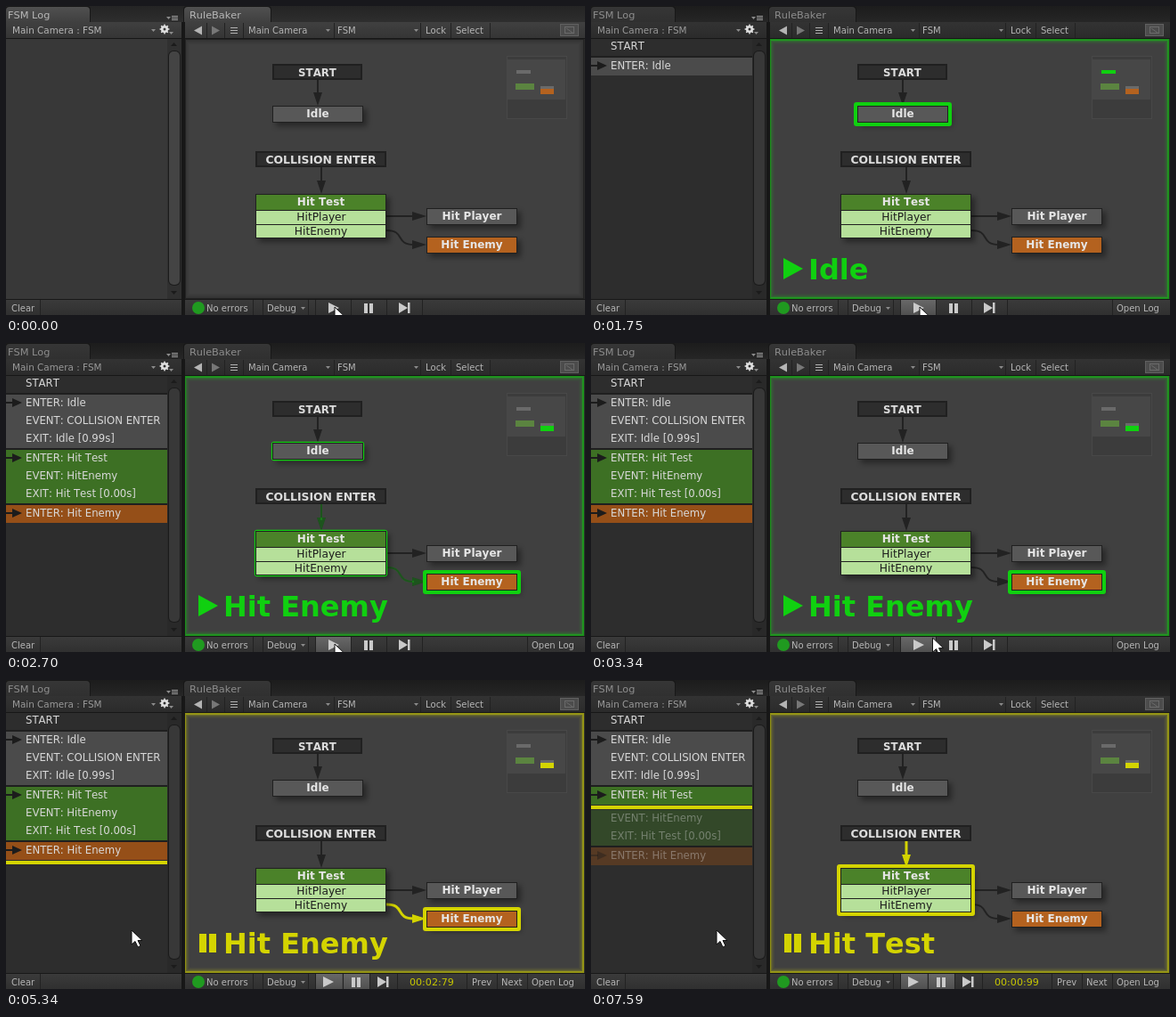
Animation, 650 px wide and 347 px high, one loop 7990 ms. Source, as an HTML page with a canvas:

```html
<!DOCTYPE html>
<html lang="en">
<head>
<meta charset="utf-8">
<title>State machine debugger</title>
<style>
html, body { margin: 0; width: 100%; height: 100%; overflow: hidden; background: #222; }
canvas { display: block; }
</style>
</head>
<body>
<canvas id="stage" width="650" height="347"></canvas>
<script>
const ctx = document.getElementById('stage').getContext('2d');
const LOOP = 7990, GREEN = '#10d010', YELLOW = '#d4d400', DARK = '#222';
ctx.fontKerning = 'none';

// Held steps: n changes, the first at time a and the last at time b.
const steps = (t, a, b, n) =>
  t < a ? 0 : Math.min(1, (Math.floor((t - a) / (b - a) * (n - 1) + 1e-6) + 1) / n);

function box(x, y, w, h, fill) {
  ctx.fillStyle = fill;
  ctx.fillRect(x, y, w, h);
}
function frame(x, y, w, h, color) {
  ctx.strokeStyle = color;
  ctx.lineWidth = 1;
  ctx.strokeRect(x + .5, y + .5, w - 1, h - 1);
}
function round(x, y, w, h, r, fill) {
  ctx.fillStyle = fill;
  ctx.beginPath();
  ctx.roundRect(x, y, w, h, r);
  ctx.fill();
}
function poly(fill, ...p) {
  ctx.fillStyle = fill;
  ctx.beginPath();
  for (let i = 0; i < p.length; i += 2) ctx.lineTo(p[i], p[i + 1]);
  ctx.closePath();
  ctx.fill();
}
function gradient(y, h, top, bottom) {
  const g = ctx.createLinearGradient(0, y, 0, y + h);
  g.addColorStop(0, top);
  g.addColorStop(1, bottom);
  return g;
}
const shade = (x, y, w, h, top, bottom) => box(x, y, w, h, gradient(y, h, top, bottom));

// y is the baseline
function text(s, x, y, size, color, align = 'left', weight = '') {
  ctx.font = `${weight} ${size}px "DejaVu Sans", Verdana, sans-serif`;
  ctx.textAlign = align;
  ctx.fillStyle = color;
  ctx.fillText(s, x, y);
}
const small = (s, x, y, color = '#b6b6b6') => text(s, x, y, 10, color);
const dropdown = (x, y) => poly('#8c8c8c', x, y, x + 5, y, x + 2.5, y + 3);
const divider = (x, y) => box(x, y, 1, 17, '#222');

function tab(x, w, title, dim) {
  round(x - 1, 0, w + 2, 18, [4, 4, 0, 0], '#181818');
  round(x, 1, w, 17, [4, 4, 0, 0], dim ? gradient(1, 17, '#363636', '#303030') : gradient(1, 17, '#505050', '#404040'));
  text(title, x ? x + 6 : 2, 14, 11.3, dim ? '#8e8e8e' : '#b8b8b8');
}

function toolbars(t) {
  const dim = t >= 1250;
  box(0, 0, 650, 347, '#202020');
  shade(0, 0, 650, 18, dim ? '#1c1c1c' : '#242424', dim ? '#262626' : '#2e2e2e');
  tab(0, 94, 'FSM Log', dim);
  tab(200, 97, 'RuleBaker', dim);
  for (const [x, w] of [[0, 197], [201, 449]]) {
    shade(x, 18, w, 18, dim ? '#333' : '#404040', dim ? '#2b2b2b' : '#353535');
    box(x, 36, w, 1, '#171717');
    shade(x, 329, w, 18, '#3b3b3b', '#303030');
    box(x, 329, w, 1, '#181818');
  }
  dropdown(180, 12);
  for (let y = 11; y < 17; y += 2) box(186, y, 7, 1, '#a0a0a0');
  text('Main Camera : FSM', 7, 31, 10.4, dim ? '#999' : '#b6b6b6');
  dropdown(163, 26);
  // settings gear
  ctx.strokeStyle = '#e0e0e0';
  ctx.lineWidth = 2.6;
  ctx.beginPath();
  ctx.arc(178, 26, 2.8, 0, 7);
  ctx.stroke();
  for (let i = 0; i < 8; i++) {
    const a = i * Math.PI / 4;
    box(177.2 + 4.6 * Math.cos(a), 25.2 + 4.6 * Math.sin(a), 1.6, 1.6, '#e0e0e0');
  }
  dropdown(183, 29);

  poly('#b4b4b4', 211, 27.5, 220, 22.5, 220, 32.5);
  poly('#777', 240, 27.5, 231, 22.5, 231, 32.5);
  for (let y = 24; y < 33; y += 3) box(252, y, 8, 1, '#b4b4b4');
  small('Main Camera', 272, 31);
  dropdown(359, 26);
  small('FSM', 372, 31);
  dropdown(458, 26);
  small('Lock', 471, 31);
  small('Select', 505, 31);
  [225, 245, 266, 368, 465, 499, 543].forEach(x => divider(x, 19));
  box(622, 20, 21, 14, '#4c4c4c');
  frame(622, 20, 21, 14, '#606060');
  frame(627, 23, 11, 8, '#6a6a6a');
  ctx.beginPath();
  ctx.moveTo(629, 25);
  ctx.lineTo(636, 30);
  ctx.stroke();

  small('Clear', 6, 343);
  divider(38, 330);
  ctx.fillStyle = '#209a20';
  ctx.beginPath();
  ctx.arc(216, 339, 7, 0, 7);
  ctx.fill();
  small('No errors', 225, 343);
  small('Debug', 293, 343);
  dropdown(331, 338);
  [277, 288, 339].forEach(x => divider(x, 330));
  playButtons(t);
}

function playButtons(t) {
  const paused = t >= 4170, w = paused ? 30.5 : 40, x0 = 347;
  const pressed = [t >= 1090, t >= 4000, false];
  pressed.forEach((down, i) => {
    const x = x0 + i * w;
    if (down) shade(x, 330, w, 17, '#686868', '#505050');
    divider(Math.round(x), 330);
  });
  divider(Math.round(x0 + 3 * w), 330);
  const [a, b, c] = paused ? [362, 393, 423] : [368, 407, 447], ink = '#cacaca';
  poly(ink, a - 6, 333, a + 6, 339, a - 6, 345);
  box(b - 5, 334, 4, 11, ink);
  box(b + 1, 334, 4, 11, ink);
  poly(ink, c - 6, 333, c + 4, 339, c - 6, 345);
  box(c + 4, 333, 2.5, 12, ink);
  if (paused) {
    text(t < 6670 ? '00:02:79' : '00:00:99', 453, 343, 11.1, '#c8c800');
    small('Prev', 523, 343);
    small('Next', 556, 343);
    [517, 551].forEach(x => divider(x, 330));
  }
  if (t >= 1450) {
    small('Open Log', 590, 343);
    divider(585, 330);
  }
}

const LOG = [
  ['START'],
  ['ENTER: Idle', '#4b4b4b'], ['EVENT: COLLISION ENTER', '#4b4b4b'], ['EXIT: Idle [0.99s]', '#4b4b4b'],
  ['ENTER: Hit Test', '#3d7024'], ['EVENT: HitEnemy', '#3d7024'], ['EXIT: Hit Test [0.00s]', '#3d7024'],
  ['ENTER: Hit Enemy', '#954f18']
];

function log(t) {
  const dim = t >= 1250;
  box(0, 37, 181, 292, dim ? '#2d2d2d' : '#383838');
  box(181, 37, 16, 292, dim ? '#292929' : '#303030');
  round(182, 50, 14, 264, 6, '#1b1b1b');
  round(183, 51, 12, 262, 5, dim ? '#383838' : '#444');
  poly('#1b1b1b', 185, 45, 188.5, 41, 192, 45);
  poly('#1b1b1b', 185, 320, 188.5, 324, 192, 320);
  box(197, 18, 4, 329, '#171717');

  const count = t < 1750 ? 0 : t < 2390 ? 2 : 8;
  const cut = t < 4170 ? 99 : t < 6730 ? 8 : t < 7190 ? 7 : t < 7590 ? 6 : 5;
  let y = 36;
  LOG.slice(0, count).forEach(([label, fill], i) => {
    const enter = label.startsWith('ENTER');
    if (enter) {
      box(0, y, 181, 2, '#1f1f1f');
      y += 2;
    }
    ctx.globalAlpha = i < cut ? 1 : .4;
    if (fill) box(0, y, 181, 20, fill);
    if (enter) {
      box(0, y + 8, 8, 2, '#1c1c1c');
      poly('#1c1c1c', 7, y + 4, 18, y + 9, 7, y + 14);
    }
    text(label, 22, y + 13, 11.7, '#d8d8d8');
    ctx.globalAlpha = 1;
    y += 20;
    if (i + 1 === cut) {
      box(0, y + 1, 181, 4, YELLOW);
      y += 6;
    }
  });
}

function arrow(lit, color, x1, y1, x2, y2) {
  const down = x1 === x2;
  const draw = (ink, width) => {
    ctx.strokeStyle = ink;
    ctx.lineWidth = width;
    ctx.beginPath();
    ctx.moveTo(x1, y1);
    if (down) ctx.lineTo(x2, y2 - 12);
    else ctx.bezierCurveTo(x1 + 22, y1, x2 - 36, y2, x2 - 14, y2);
    ctx.stroke();
    if (down) poly(ink, x2 - 5, y2 - 15, x2 + 5, y2 - 15, x2, y2);
    else poly(ink, x2 - 16, y2 - 5, x2, y2, x2 - 16, y2 + 5);
  };
  draw(DARK, 2);
  if (lit) {
    ctx.globalAlpha = lit;
    draw(color, 2 + lit);
    ctx.globalAlpha = 1;
  }
}

function state(name, x, y, w, h, fill, lit, color) {
  ctx.shadowColor = 'rgba(0,0,0,.4)';
  ctx.shadowBlur = 6;
  ctx.shadowOffsetX = ctx.shadowOffsetY = 4;
  box(x, y, w, h, '#262626');
  ctx.shadowColor = 'transparent';
  const grow = 4 * lit;
  if (lit) round(x - grow, y - grow, w + 2 * grow, h + 2 * grow, 3, color);
  box(x, y, w, h, '#202020');
  box(x + 1, y + 1, w - 2, 17, fill);
  text(name, x + w / 2, y + 13, 12, '#e6e6e6', 'center', 'bold');
}

function eventBox(name, x, y, w, size) {
  box(x, y, w, 18, '#202020');
  box(x + 2, y + 2, w - 4, 14, '#2d2d2d');
  text(name, x + w / 2, y + 14, size, '#dcdcdc', 'center', 'bold');
}

function graph(t) {
  const on = t >= 1450, paused = t >= 4170, color = paused ? YELLOW : GREEN;
  const fade = t < 2390 ? 0 : 1 - steps(t, 2390, 2850, 7);
  const idle = t < 2390 ? +on : fade;
  const test = t < 6670 ? fade : 1;
  const enemy = +(t >= 2390 && t < 6670);

  box(201, 37, 449, 292, '#2a2a2a');
  box(202, 38, 446, 290, '#404040');
  for (let i = 0; i < 6; i++) {
    ctx.globalAlpha = on ? [.6, .6, .28, .15, .08, .04][i] : .3 - i * .05;
    frame(200 + i, 37 + i, 449 - 2 * i, 292 - 2 * i, on ? color : '#111');
  }
  ctx.globalAlpha = 1;

  // minimap
  box(562, 56, 68, 71, '#3c3c3c');
  frame(562, 56, 68, 71, '#484848');
  box(562, 60, 66, 45, '#474747');
  box(573, 72, 16, 4, on && t < 2390 ? GREEN : '#6a6a6a');
  box(572, 87, 21, 7, '#5b8440');
  box(600, 90, 15, 3, '#6a6a6a');
  box(600, 93, 15, 6, t >= 2390 ? color : '#b4621f');

  arrow(+(on && t < 1680), color, 350, 83, 350, 112);
  arrow(t < 7140 ? fade : 1, color, 354, 181, 354, 211);
  arrow(0, color, 427, 236, 472, 236);
  arrow(paused && t < 7140 ? 1 : fade, color, 427, 252, 472, 268);

  eventBox('START', 299, 65, 101, 11.8);
  eventBox('COLLISION ENTER', 280, 163, 147, 12.4);
  state('Idle', 299, 112, 102, 19, '#585858', idle, color);
  state('Hit Test', 280, 211, 147, 50, '#4b8229', test, color);
  box(281, 230, 145, 15, '#b6e09a');
  box(281, 246, 145, 14, '#b6e09a');
  text('HitPlayer', 354, 241, 12.2, '#1c1c1c', 'center');
  text('HitEnemy', 353.5, 257, 12.2, '#1c1c1c', 'center');
  state('Hit Player', 472, 227, 102, 19, '#585858', 0);
  state('Hit Enemy', 472, 259, 102, 19, '#b4621f', enemy, color);

  if (!on) return;
  if (paused) {
    box(217, 285, 8, 21, color);
    box(228, 285, 8, 21, color);
  } else {
    poly(color, 216, 283, 238, 295, 216, 307);
  }
  text(t < 2390 ? 'Idle' : t < 6670 ? 'Hit Enemy' : 'Hit Test', 244, 307, 32, color, 'left', 'bold');
}

function cursor(t) {
  let x, y;
  if (t < 4730) {
    const u = 1 - (1 - steps(t, 3340, 3850, 8)) ** 3, v = 1 - u;
    x = 369 + 44 * u;
    y = 338 * v ** 3 + 3 * 339 * v * v * u + 3 * 305 * v * u * u + 335 * u ** 3;
  } else {
    const k = steps(t, 4730, 5340, 9), u = k * k * (3 - 2 * k);
    x = 413 - 272 * u;
    y = 335 - 54 * u;
  }
  ctx.save();
  ctx.translate(x, y);
  poly('#fff', 0, 0, 0, 16, 4, 12.5, 7, 19, 10, 17.5, 7, 11.5, 12, 11.5);
  ctx.strokeStyle = '#111';
  ctx.lineWidth = 1;
  ctx.stroke();
  ctx.restore();
}

function render() {
  const t = performance.now() % LOOP;
  toolbars(t);
  graph(t);
  log(t);
  cursor(t);
  requestAnimationFrame(render);
}
render();
</script>
</body>
</html>
```
